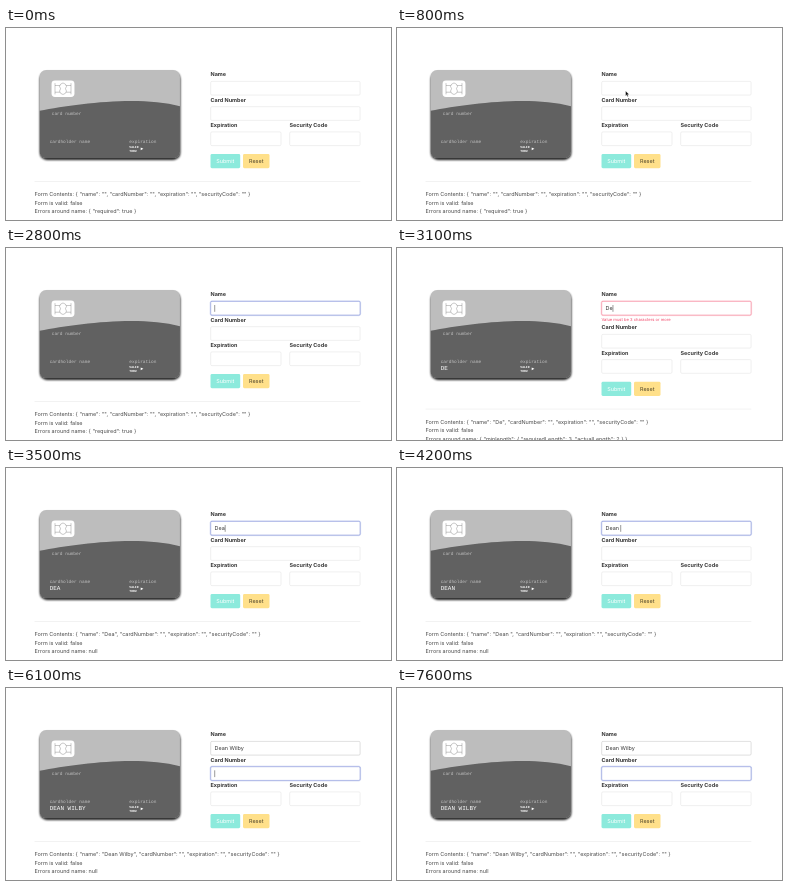
An HTML page for the animation above (8 s loop, 385 px wide and 192 px high).

```html
<!DOCTYPE html>
<html lang="en">
<head>
<meta charset="utf-8">
<title>Card form</title>
<style>
html, body { margin: 0; width: 100%; height: 100%; overflow: hidden; background: #fff; }
svg { display: block; width: 100%; height: 100%; }
text { font: 5.46px Inter, "Open Sans", sans-serif; fill: #4a4a4a; white-space: pre; text-rendering: geometricPrecision; }
.label { font-weight: 700; fill: #363636; }
.value { fill: #363636; }
.help { font-size: 4.1px; fill: #f14668; }
.btn { text-anchor: middle; }
.card text { font: 24px "Liberation Mono", monospace; fill: #fff; }
.card .dim { opacity: .6; }
.card .tiny { font-size: 16.5px; font-weight: 700; }
.card .holder { font-size: 32px; }
.chip { fill: none; stroke: #4c4c4c; stroke-width: 1.6; }
.field rect { fill: #fff; stroke-width: .42; }
.field .ring { fill: none; stroke-width: .75; stroke-opacity: .25; }
</style>
</head>
<body>
<svg viewBox="0 0 385 192" preserveAspectRatio="none">
  <defs>
    <filter id="blur" x="-10%" y="-10%" width="120%" height="125%"><feGaussianBlur stdDeviation="1"/></filter>
    <clipPath id="round"><rect width="750" height="471" rx="36"/></clipPath>
  </defs>

  <rect x="33.8" y="43.7" width="140.5" height="88.2" rx="7" opacity=".9" filter="url(#blur)"/>
  <g class="card" transform="translate(33.5 42) scale(.1873)">
    <g clip-path="url(#round)">
      <rect width="750" height="471" fill="#bdbdbd"/>
      <path d="M750 471V193.2C532.4 135.7 193.6 179.7 0 218.1V471Z" fill="#616161"/>
    </g>
    <rect x="64.4" y="56.4" width="122.2" height="87.2" rx="18.5" fill="#fff"/>
    <g class="chip">
      <path d="M82.8 70V130M168.1 70V130M82.8 82.8H108.6M82.8 118.6H109M142.4 82.8H168.1M142 118.6H168.1"/>
      <path d="M112.6 100A17.7 17.7 0 1 1 138.4 100A17.7 17.7 0 1 1 112.6 100Z"/>
    </g>
    <text class="dim" x="65.1" y="241.5">card number</text>
    <text class="dim" x="54.1" y="389.9">cardholder name</text>
    <text class="dim" x="479.8" y="388.9">expiration</text>
    <text class="tiny" x="479.4" y="417">VALID</text>
    <text class="tiny" x="479.4" y="435.7">THRU</text>
    <path d="M554.5 421L540.4 414.2V427.9Z" fill="#fff"/>
    <text class="holder" id="holder" x="54.1" y="428.2"></text>
  </g>

  <text class="label" x="204.5" y="48.3">Name</text>
  <g class="field" id="nameField"></g>
  <text class="value" id="nameText" x="208.6" y="62.2"></text>
  <text class="help" id="help" x="204.5" y="73.1">Value must be 3 characters or more</text>

  <g id="below">
    <text class="label" x="204.5" y="73.6">Card Number</text>
    <text class="label" x="204.5" y="98.9">Expiration</text>
    <text class="label" x="283.5" y="98.9">Security Code</text>
    <g class="field" id="numberField"></g>
    <g class="field" id="expiryField"></g>
    <g class="field" id="codeField"></g>
    <rect x="204.5" y="126.1" width="29.7" height="14.1" rx="1.4" fill="#00d1b2" opacity=".45"/>
    <text class="btn" x="219.3" y="135.2" style="fill:#fff">Submit</text>
    <rect x="237" y="126.1" width="26.5" height="14.1" rx="1.4" fill="#ffe08a"/>
    <text class="btn" x="250.2" y="135.2" style="fill:#000;fill-opacity:.7">Reset</text>
    <rect x="28.5" y="153" width="325.8" height=".7" fill="#ededed"/>
    <text id="contents" x="28.5" y="168.4"></text>
    <text x="28.5" y="176.7">Form is valid: false</text>
    <text id="errors" x="28.5" y="185.1"></text>
  </g>

  <rect id="caret" y="57" width=".5" height="6.8" fill="#363636"/>
  <path id="pointer" d="M0 0V5L1.15 4L1.95 5.8L2.75 5.45L1.95 3.7H3.5Z" fill="#000" stroke="#fff" stroke-width=".35"/>
</svg>
<script>
const $ = id => document.getElementById(id);
const LOOP = 8000;
const FULL = "Dean Wilby";

// [time, letters typed]
const TYPED = [[0, 0], [2900, 1], [3100, 2], [3500, 3], [3800, 4], [4200, 5],
  [4400, 6], [4500, 7], [4700, 8], [4800, 9], [5000, 10]];
// [time, caret visible]
const BLINK = [[0, 0], [1600, 1], [2100, 0], [2600, 1], [5500, 0], [6000, 1],
  [6600, 0], [7100, 1], [7600, 0]];
// [time, x, y]
const PATH = [[400, 203, 59.6], [500, 211, 60.8], [600, 219.5, 61.9], [700, 226, 62.6],
  [800, 228.6, 62.9], [1100, 228.5, 62.5], [1400, 228.6, 62.3]];
const FOCUS = 1600, KEYPRESS = 2800, TAB = 6100;

const at = (table, t) => table.filter(row => row[0] <= t).pop();

function field(id, x, y, w) {
  const rect = (cls, grow) =>
    `<rect class="${cls}" x="${x - grow}" y="${y - grow}" width="${w + 2 * grow}" height="${14.1 + 2 * grow}" rx="${1.4 + grow}"/>`;
  $(id).innerHTML = rect("ring", .35) + rect("edge", -.2);
  paint(id, "#dbdbdb");
}

function paint(id, color, ring) {
  const [halo, edge] = $(id).children;
  edge.setAttribute("stroke", color);
  halo.setAttribute("stroke", ring ? color : "none");
}

function setText(id, s) {
  if ($(id).textContent !== s) $(id).textContent = s;
}

function show(id, on) {
  $(id).setAttribute("visibility", on ? "visible" : "hidden");
}

function errorText(n) {
  if (!n) return '{ "required": true }';
  return n < 3 ? `{ "minlength": { "requiredLength": 3, "actualLength": ${n} } }` : "null";
}

function draw(t) {
  const n = at(TYPED, t)[1];
  const name = FULL.slice(0, n);
  const bad = n > 0 && n < 3;
  const onName = t >= FOCUS && t < TAB;
  const onNumber = t >= TAB;

  setText("nameText", name);
  setText("holder", name.toUpperCase());
  setText("contents", `Form Contents: { "name": "${name}", "cardNumber": "", "expiration": "", "securityCode": "" }`);
  setText("errors", "Errors around name: " + errorText(n));

  show("help", bad);
  $("below").setAttribute("transform", `translate(0 ${bad ? 7.7 : 0})`);
  paint("nameField", bad ? "#f14668" : onName ? "#485fc7" : onNumber ? "#b5b5b5" : "#dbdbdb", onName);
  paint("numberField", onNumber ? "#485fc7" : "#dbdbdb", onNumber);

  const typedWidth = n && onName ? $("nameText").getComputedTextLength() : 0;
  $("caret").setAttribute("x", 208.6 + typedWidth);
  $("caret").setAttribute("y", onNumber ? 82.3 : 57);
  show("caret", at(BLINK, t)[1]);

  const spot = at(PATH, t);
  show("pointer", spot && t < KEYPRESS);
  if (spot) $("pointer").setAttribute("transform", `translate(${spot[1]} ${spot[2]})`);
}

field("nameField", 204.5, 53.2, 149.8);
field("numberField", 204.5, 78.5, 149.8);
field("expiryField", 204.5, 103.7, 70.7);
field("codeField", 283.5, 103.7, 70.8);

const start = performance.now();
function tick() {
  draw((performance.now() - start) % LOOP);
  requestAnimationFrame(tick);
}
tick();
</script>
</body>
</html>
```
